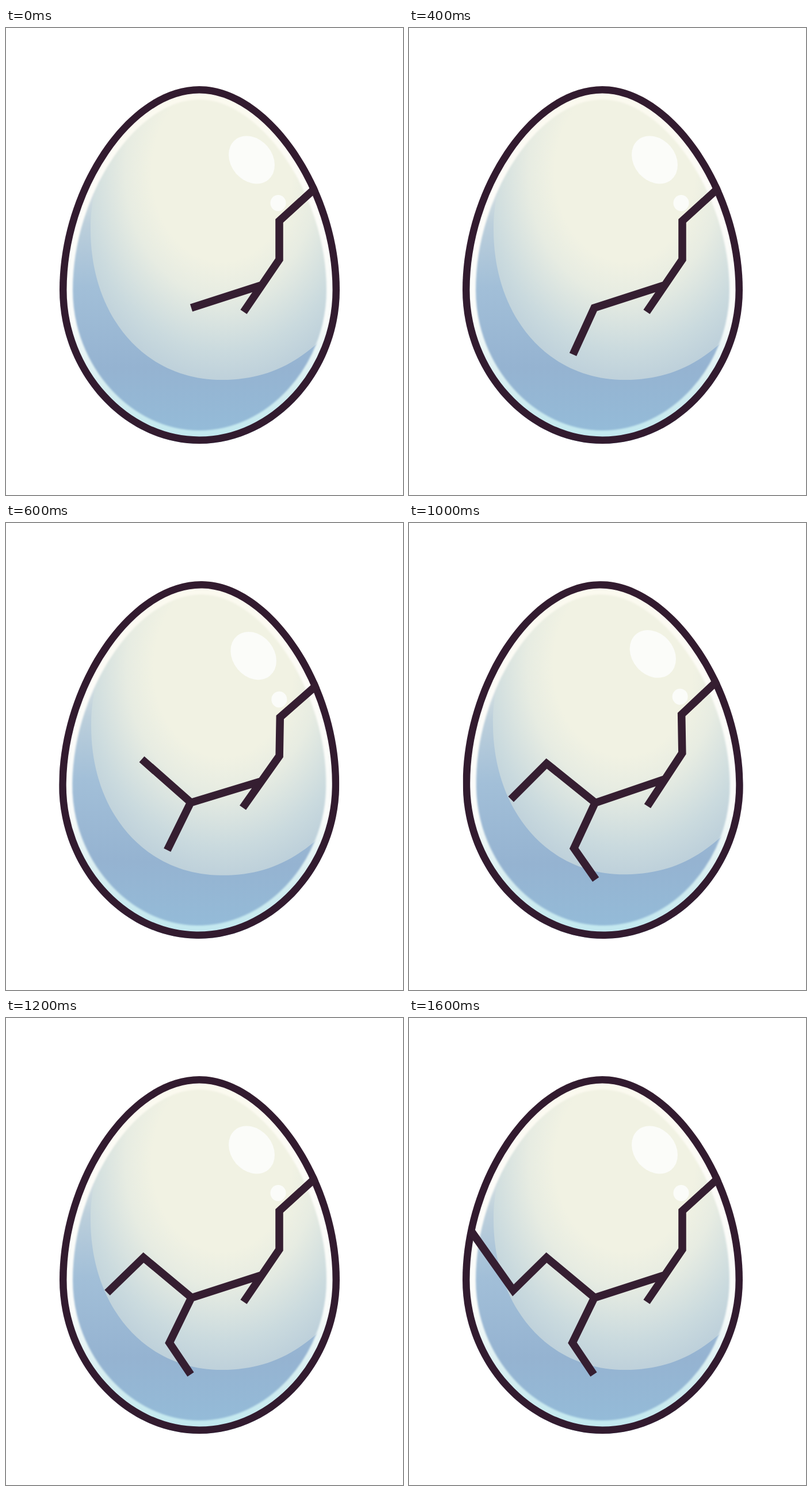
Animation, 690 px wide and 811 px high, one loop 6800 ms. Source, as an HTML page:

```html
<!DOCTYPE html>
<html lang="en">
<head>
<meta charset="utf-8">
<title>Cracking egg</title>
<style>
  html, body { margin: 0; width: 100%; height: 100%; overflow: hidden; background: #fff; }
  svg { display: block; width: 100%; height: 100%; }
</style>
</head>
<body>
<svg viewBox="0 0 690 811">
  <defs>
    <path id="shell" d="M336 101C458 101 580 278 580 455C580 599 468 722 336 722C204 722 93 599 93 455C93 278 211 101 336 101Z"/>
    <clipPath id="inside"><use href="#shell"/></clipPath>
    <linearGradient id="shade" gradientUnits="userSpaceOnUse" x1="0" y1="260" x2="0" y2="700">
      <stop offset="0" stop-color="#dfe6e4"/>
      <stop offset=".18" stop-color="#bccfdb"/>
      <stop offset=".43" stop-color="#a2bfd8"/>
      <stop offset=".75" stop-color="#95b3d1"/>
      <stop offset="1" stop-color="#94bbd8"/>
    </linearGradient>
    <radialGradient id="light" gradientUnits="userSpaceOnUse" cx="0" cy="0" r="370" gradientTransform="translate(375 250) scale(.78 1)">
      <stop offset=".42" stop-color="#f1f2e3"/>
      <stop offset=".58" stop-color="#e7ece2"/>
      <stop offset=".84" stop-color="#cadade"/>
      <stop offset="1" stop-color="#bccfda"/>
    </radialGradient>
    <linearGradient id="rim" gradientUnits="userSpaceOnUse" x1="0" y1="101" x2="0" y2="722">
      <stop offset="0" stop-color="#fbf9ee"/>
      <stop offset=".3" stop-color="#fdfcf8"/>
      <stop offset=".65" stop-color="#fafcfa"/>
      <stop offset=".85" stop-color="#d2ecf0"/>
      <stop offset="1" stop-color="#bfe7ef"/>
    </linearGradient>
    <filter id="soft"><feGaussianBlur stdDeviation="1.5"/></filter>
  </defs>
  <g id="egg" clip-path="url(#inside)" fill="none">
    <use href="#shell" fill="url(#shade)"/>
    <path fill="url(#light)" d="M165 250C150 290 147 320 147 350C147 500 240 611 375 611C450 611 505 585 560 530L600 90H165Z"/>
    <use href="#shell" stroke="url(#rim)" stroke-width="46" filter="url(#soft)"/>
    <g fill="#fbfcf9">
      <ellipse rx="36" ry="45" transform="translate(427 229) rotate(-40)"/>
      <ellipse cx="473" cy="304" rx="13.5" ry="14"/>
    </g>
    <use href="#shell" stroke="#321b2f" stroke-width="25"/>
    <path id="crack" stroke="#351e31" stroke-width="13.5"/>
  </g>
</svg>
<script>
  const egg = document.getElementById("egg");
  const crack = document.getElementById("crack");
  const LOOP = 6800, STEP = 200;
  const tilts = [0, 1, 0, 1, 0, -1, 0, 1, 0];

  // Each stage continues the main fissure with more branches.
  const trunk = "M541 275L475 335V402L413 493M446 446L322 486";
  const stages = [
    "",
    "L285 567",
    "L283 569M323 486L236 412",
    "L284 564L321 619M323 486L239 416L176 477",
    "L284 564L321 619M323 486L239 416L181 473L108 370"
  ];

  function draw(now) {
    const step = Math.min(8, Math.floor(now % LOOP / STEP));
    crack.setAttribute("d", trunk + stages[Math.ceil(step / 2)]);
    egg.setAttribute("transform", `rotate(${tilts[step]} 336 411)`);
  }

  let start;
  function tick(now) {
    start ??= now;
    draw(now - start);
    requestAnimationFrame(tick);
  }
  draw(0);
  requestAnimationFrame(tick);
</script>
</body>
</html>
```
